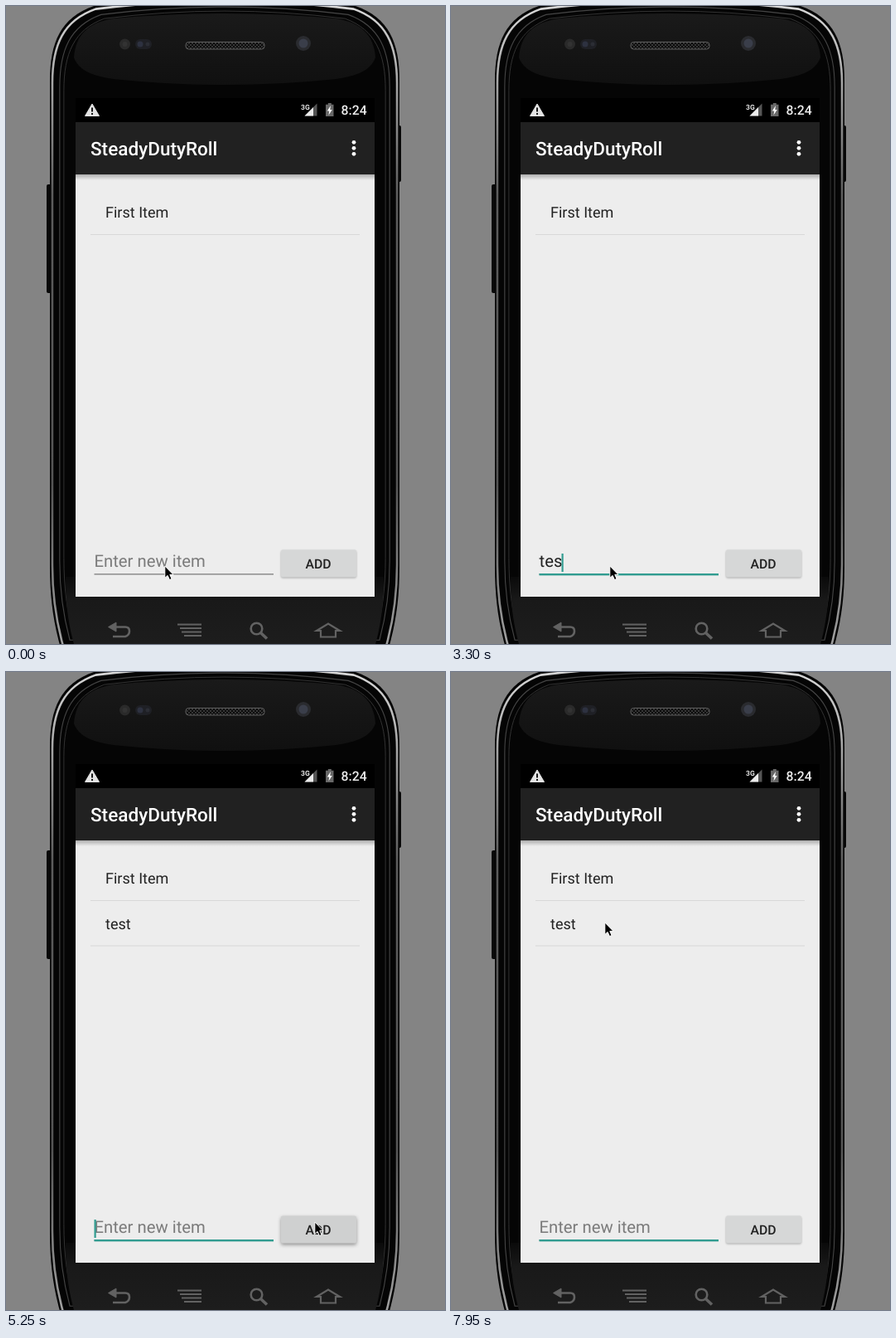
Recreate the animation shown at these times as an HTML page. Size 530 by 769 pixels, loop 8 s.

```html
<!DOCTYPE html>
<html lang="en">
<head>
<meta charset="utf-8">
<title>Todo list demo</title>
<style>
html, body { margin: 0; width: 100%; height: 100%; overflow: hidden; background: #848484; }
svg { display: block; width: 530px; height: 769px; }
text { font-family: Roboto, "Liberation Sans", sans-serif; text-rendering: geometricPrecision; white-space: pre; }
.medium { font-weight: 500; }
.item { font-size: 18.05px; fill: #212121; }
.field { font-size: 20.3px; }
.line { fill: none; vector-effect: non-scaling-stroke; }

/* Every state change is a hard cut on one shared 8 s clock. */
.anim { animation: 8s step-end infinite; }
#mouse { animation-name: mouse; }
#caret { animation-name: blink, caret-move; }
#focus { animation-name: focus; }
#hint { animation-name: hint; }
#added { animation-name: added; }
#add { animation-name: press; }
.k1 { animation-name: key1; }
.k2 { animation-name: key2; }
.k3 { animation-name: key3; }
.k4 { animation-name: key4; }

@keyframes focus { 0% { opacity: 0; } 5.625%, 100% { opacity: 1; } }
@keyframes blink {
  0%, 11.25%, 24.375%, 50.625%, 63.75%, 71.25%, 84.375%, 97.5%, 100% { opacity: 0; }
  5.625%, 16.875%, 30%, 56.25%, 65.625%, 78.75%, 90% { opacity: 1; }
}
@keyframes caret-move {
  0% { transform: translateX(0); }
  33.75% { transform: translateX(6px); }
  37.5% { transform: translateX(17px); }
  41.25% { transform: translateX(27px); }
  45% { transform: translateX(34px); }
  65.625%, 100% { transform: translateX(0); }
}
@keyframes hint { 0%, 65.625%, 100% { visibility: visible; } 33.75% { visibility: hidden; } }
@keyframes added { 0% { visibility: hidden; } 65.625%, 100% { visibility: visible; } }
@keyframes key1 { 0%, 65.625%, 100% { visibility: hidden; } 33.75% { visibility: visible; } }
@keyframes key2 { 0%, 65.625%, 100% { visibility: hidden; } 37.5% { visibility: visible; } }
@keyframes key3 { 0%, 65.625%, 100% { visibility: hidden; } 41.25% { visibility: visible; } }
@keyframes key4 { 0%, 65.625%, 100% { visibility: hidden; } 45% { visibility: visible; } }
@keyframes press {
  0%, 67.5%, 100% { fill: #d6d7d7; filter: drop-shadow(0 1px 1px rgba(0,0,0,.28)); }
  63.75% { fill: #cbcccc; filter: drop-shadow(0 2px 2px rgba(0,0,0,.42)); }
  65.625% { fill: #cfd0d0; filter: drop-shadow(0 2px 2px rgba(0,0,0,.38)); }
}
@keyframes mouse {
  0% { transform: translate(191px, 674px); }
  48.75% { transform: translate(203px, 677px); }
  50.625% { transform: translate(256px, 679px); }
  52.5% { transform: translate(320px, 673px); }
  54.375% { transform: translate(362px, 665px); }
  56.25% { transform: translate(372px, 662px); }
  80.625% { transform: translate(345px, 608px); }
  82.5% { transform: translate(271px, 474px); }
  84.375% { transform: translate(227px, 391px); }
  88.125% { transform: translate(220px, 367px); }
  90% { transform: translate(212px, 344px); }
  91.875% { transform: translate(208px, 334px); }
  93.75% { transform: translate(203px, 326px); }
  95.625% { transform: translate(195px, 315px); }
  97.5% { transform: translate(188px, 305px); }
  99.375%, 100% { transform: translate(185px, 301px); }
}
</style>
</head>
<body>
<svg viewBox="0 0 530 769">
  <defs>
    <path id="shell" d="M53 90C53 44 66 14 106 0Q264 -19 422 0C462 14 475 44 475 90V676C475 713 471 742 462 774H66C57 742 53 713 53 676Z"/>
    <linearGradient id="rim" x2="0" y2="1">
      <stop offset="0" stop-color="#dadada"/>
      <stop offset=".12" stop-color="#a8a8a8"/>
      <stop offset=".3" stop-color="#5c5c5c"/>
      <stop offset=".75" stop-color="#555"/>
      <stop offset="1" stop-color="#a0a0a0"/>
    </linearGradient>
    <linearGradient id="gloss" x2="0" y2="1">
      <stop offset="0" stop-color="#1a1a1a"/>
      <stop offset="1" stop-color="#101010"/>
    </linearGradient>
    <linearGradient id="chin" x2="0" y2="1">
      <stop offset="0" stop-color="#0a0a0a"/>
      <stop offset=".35" stop-color="#191919"/>
      <stop offset="1" stop-color="#1d1d1d"/>
    </linearGradient>
    <linearGradient id="shade" x2="0" y2="1">
      <stop offset="0" stop-color="#000" stop-opacity=".27"/>
      <stop offset="1" stop-color="#000" stop-opacity="0"/>
    </linearGradient>
    <pattern id="mesh" width="4" height="4" patternUnits="userSpaceOnUse">
      <rect width="4" height="4" fill="#0b0b0b"/>
      <circle cx="1" cy="1" r=".9" fill="#484848"/>
      <circle cx="3" cy="3" r=".9" fill="#484848"/>
    </pattern>
  </defs>

  <rect width="530" height="769" fill="#848484"/>

  <!-- Phone body -->
  <rect x="49" y="215" width="8" height="131" rx="2" fill="#080808"/>
  <rect x="470" y="144" width="7" height="68" rx="2" fill="#080808"/>
  <use href="#shell" fill="#050505"/>
  <use href="#shell" class="line" stroke="url(#rim)" stroke-width="2.6" transform="translate(264 400) scale(.986 .991) translate(-264 -400)"/>
  <use href="#shell" class="line" stroke="#444" stroke-width="1.2" transform="translate(264 400) scale(.944 .974) translate(-264 -400)"/>
  <use href="#shell" class="line" stroke="#363636" transform="translate(264 400) scale(.92 .962) translate(-264 -400)"/>
  <path d="M82 62C84 36 98 20 130 15Q264 3 398 15C430 20 444 36 446 62C440 78 424 84 398 88Q264 102 130 88C104 84 88 78 82 62Z" fill="url(#gloss)"/>
  <path d="M72 688H456C456 720 453 744 446 769H82C75 744 72 720 72 688Z" fill="url(#chin)"/>

  <!-- Speaker and sensors -->
  <rect x="217" y="43.5" width="95" height="8.5" rx="3.5" fill="url(#mesh)" stroke="#606060"/>
  <circle cx="143.5" cy="46" r="6.5" fill="#2a2a2a"/>
  <circle cx="143.5" cy="46" r="3" fill="#333"/>
  <rect x="156" y="40" width="20" height="12" rx="6" fill="#1f2025"/>
  <circle cx="162" cy="46" r="3.5" fill="#2d3140"/>
  <circle cx="171" cy="46" r="2.5" fill="#2b2d34"/>
  <circle cx="359" cy="45" r="9" fill="#2a2b2f"/>
  <circle cx="359" cy="45" r="5.5" fill="#3a3e4a"/>

  <!-- Hardware keys -->
  <g fill="none" stroke="#626262" stroke-width="2.6">
    <path d="M130 748.5H144Q149 748.5 149 753.5T144 760H129"/>
    <path d="M133 743L123.5 748.5L133 754Z" fill="#626262" stroke-width="1"/>
    <path d="M207 745.5H236M210 750H236M212 754.5H236M215 759H236" stroke-width="2"/>
    <circle cx="302.5" cy="750.5" r="6.8"/>
    <path d="M307.5 755.5L315 762.5" stroke-width="3.6"/>
    <path d="M375 753L389 744.5L403 753H398V760.5H380V753Z" stroke-width="2.2"/>
  </g>

  <!-- Screen -->
  <rect x="84" y="111" width="361" height="30" fill="#000"/>
  <rect x="84" y="203" width="361" height="509" fill="#ededed"/>
  <rect x="84" y="203" width="361" height="7" fill="url(#shade)"/>
  <rect x="84" y="140" width="361" height="63" fill="#212121"/>

  <!-- Status bar -->
  <path d="M104 118L112.5 132.5H95.5Z" fill="#e4e4e4" stroke="#e4e4e4" stroke-linejoin="round"/>
  <path d="M104 122.5V127.5M104 129V131" stroke="#000" stroke-width="1.8"/>
  <text x="356" y="125" font-size="8.5" font-weight="700" fill="#e4e4e4">3G</text>
  <path d="M375.5 117.5V132.5H360.5Z" fill="#555"/>
  <path d="M371 122V132.5H360.5Z" fill="#ececec"/>
  <path d="M388.8 117H392.8V118.7H395.5V133H386V118.7H388.8Z" fill="#686868"/>
  <path d="M392 120L387.8 126.5H390.3L389.5 131.5L393.7 125H391.2Z" fill="#fff"/>
  <text x="404.5" y="131.2" class="medium" font-size="15.8" fill="#ececec">8:24</text>

  <!-- App bar -->
  <text x="102" y="179.5" class="medium" font-size="22.56" fill="#fff">SteadyDutyRoll</text>
  <g fill="#fff">
    <circle cx="420" cy="164.3" r="2.4"/>
    <circle cx="420" cy="171.3" r="2.4"/>
    <circle cx="420" cy="178.3" r="2.4"/>
  </g>

  <!-- List -->
  <text x="120" y="254.5" class="item">First Item</text>
  <rect x="102" y="275" width="325" height="1" fill="#d8d8d8"/>
  <g id="added" class="anim">
    <text x="120" y="309.5" class="item">test</text>
    <rect x="102" y="329.5" width="325" height="1" fill="#d8d8d8"/>
  </g>

  <!-- Input row -->
  <text id="hint" class="field anim" x="106.5" y="676" fill="#7b7b7b">Enter new item</text>
  <text class="field" x="106.5" y="676" fill="#212121"><tspan class="anim k1">t</tspan><tspan class="anim k2">e</tspan><tspan class="anim k3">s</tspan><tspan class="anim k4">t</tspan></text>
  <rect x="106.5" y="684.3" width="216.5" height="1.2" fill="#757575"/>
  <rect id="focus" class="anim" x="106.5" y="684" width="216.5" height="2.4" fill="#319c90"/>
  <rect id="caret" class="anim" x="106.5" y="660" width="2.2" height="22" fill="#319c90"/>
  <rect id="add" class="anim" x="332" y="655.5" width="91" height="33" rx="2" fill="#d6d7d7"/>
  <text x="377" y="677.6" class="medium" font-size="15.8" text-anchor="middle" fill="#212121">ADD</text>

  <g id="mouse" class="anim">
    <path d="M.8 1V15.4L4.1 12.4L6.5 17.6L9.1 16.5L6.8 11.4H11Z" fill="#000" stroke="#fff" stroke-width="1" stroke-linejoin="round"/>
  </g>
</svg>
</body>
</html>
```
